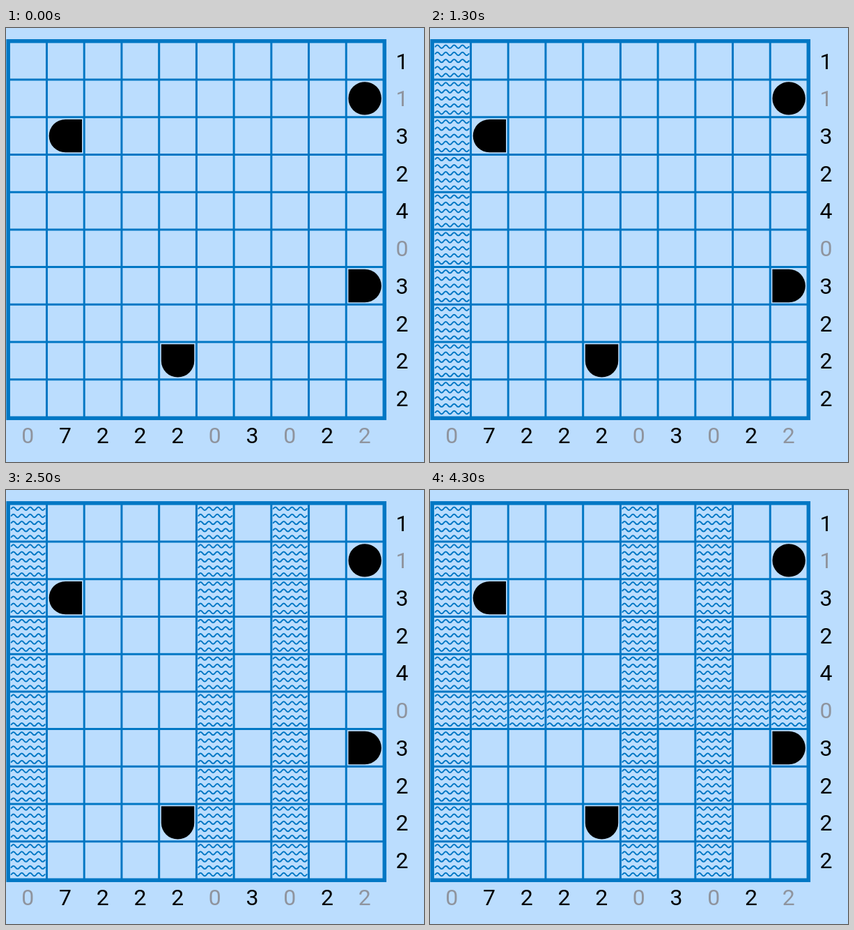
An HTML page for the animation above (4500 ms loop, 600x622 px).

```html
<!DOCTYPE html>
<html lang="en">
<head>
<meta charset="utf-8">
<title>Grid puzzle</title>
<style>
  html, body { margin: 0; width: 100%; height: 100%; overflow: hidden; background: #bbddfe; }
  svg { display: block; width: 600px; height: 622px; }
  .line { fill: none; stroke: #0077c4; stroke-width: 3; }
  .frame { stroke-width: 5.5; }
  .wave { fill: none; stroke: #0077c4; stroke-width: 2; stroke-linecap: round; }
  text { font: 32px Roboto, Arial, sans-serif; text-anchor: middle; fill: #000; }
  .done { fill: #8f949e; }
</style>
</head>
<body>
<svg id="board" viewBox="0 0 600 622"></svg>
<script>
const LOOP = 4500, TICK = 100, STEP = 50;
const N = 10, SIZE = 53.72, LEFT = 4.8, TOP = 20.3;
const board = document.getElementById('board');

function add(tag, attrs, text) {
  const el = document.createElementNS('http://www.w3.org/2000/svg', tag);
  for (const key in attrs) el.setAttribute(key, attrs[key]);
  if (text !== undefined) el.textContent = text;
  board.appendChild(el);
  return el;
}

const midX = col => LEFT + (col + 0.5) * SIZE;
const midY = row => TOP + (row + 0.5) * SIZE;

// Water: five rippled strokes per cell
const ripple = y => `M-24 ${y}q3 -4.4 6 0` + 't6 0'.repeat(7);
const wavePath = [-2, -1, 0, 1, 2].map(i => ripple(i * 10.2)).join('');
const water = [];

function fill(start, cells) {
  cells.forEach(([col, row], i) => {
    if (water.some(w => w.col === col && w.row === row)) return;
    const el = add('path', {
      class: 'wave', d: wavePath,
      transform: `translate(${midX(col)} ${midY(row)})`
    });
    water.push({ el, col, row, at: start + STEP * (i + 1) });
  });
}

const index = [...Array(N).keys()];
const column = col => index.map(row => [col, row]);
const rowOf = row => index.map(col => [col, row]);

fill(0, column(0));
fill(1400, column(5));
fill(2000, column(7));
fill(3400, rowOf(5));

// Grid
for (let i = 1; i < N; i++) {
  const x = LEFT + i * SIZE, y = TOP + i * SIZE;
  add('path', { class: 'line', d: `M${x} 19V559M3 ${y}H543` });
}
add('rect', { class: 'line frame', x: 3.2, y: 18.8, width: 540.1, height: 540.4 });

// Ship parts; the turn is in degrees from a left-pointing end
const R = 23.7;
const endPath = `M${R} ${-R}H0A${R} ${R} 0 0 0 0 ${R}H${R}Z`;
function shipEnd(col, row, turn) {
  add('path', { d: endPath, transform: `translate(${midX(col)} ${midY(row)}) rotate(${turn})` });
}
add('circle', { cx: midX(9), cy: midY(1), r: R });
shipEnd(1, 2, 0);
shipEnd(9, 6, 180);
shipEnd(4, 8, -90);

// Clues
function clue(digit, x, y, done) {
  add('text', { x, y: y + 11.4, class: done ? 'done' : '' }, digit);
}
[...'1132403222'].forEach((d, row) => clue(d, 568.5, midY(row), row === 1 || row === 5));
[...'0722203022'].forEach((d, col) => clue(d, midX(col) - 0.4, 584, d === '0' || col === 9));

function draw(now) {
  const t = Math.floor((now % LOOP) / TICK) * TICK;
  for (const w of water) w.el.style.display = t >= w.at ? '' : 'none';
}

let origin = null;
function tick(now) {
  if (origin === null) origin = now;
  draw(now - origin);
  requestAnimationFrame(tick);
}
draw(0);
requestAnimationFrame(tick);
</script>
</body>
</html>
```
